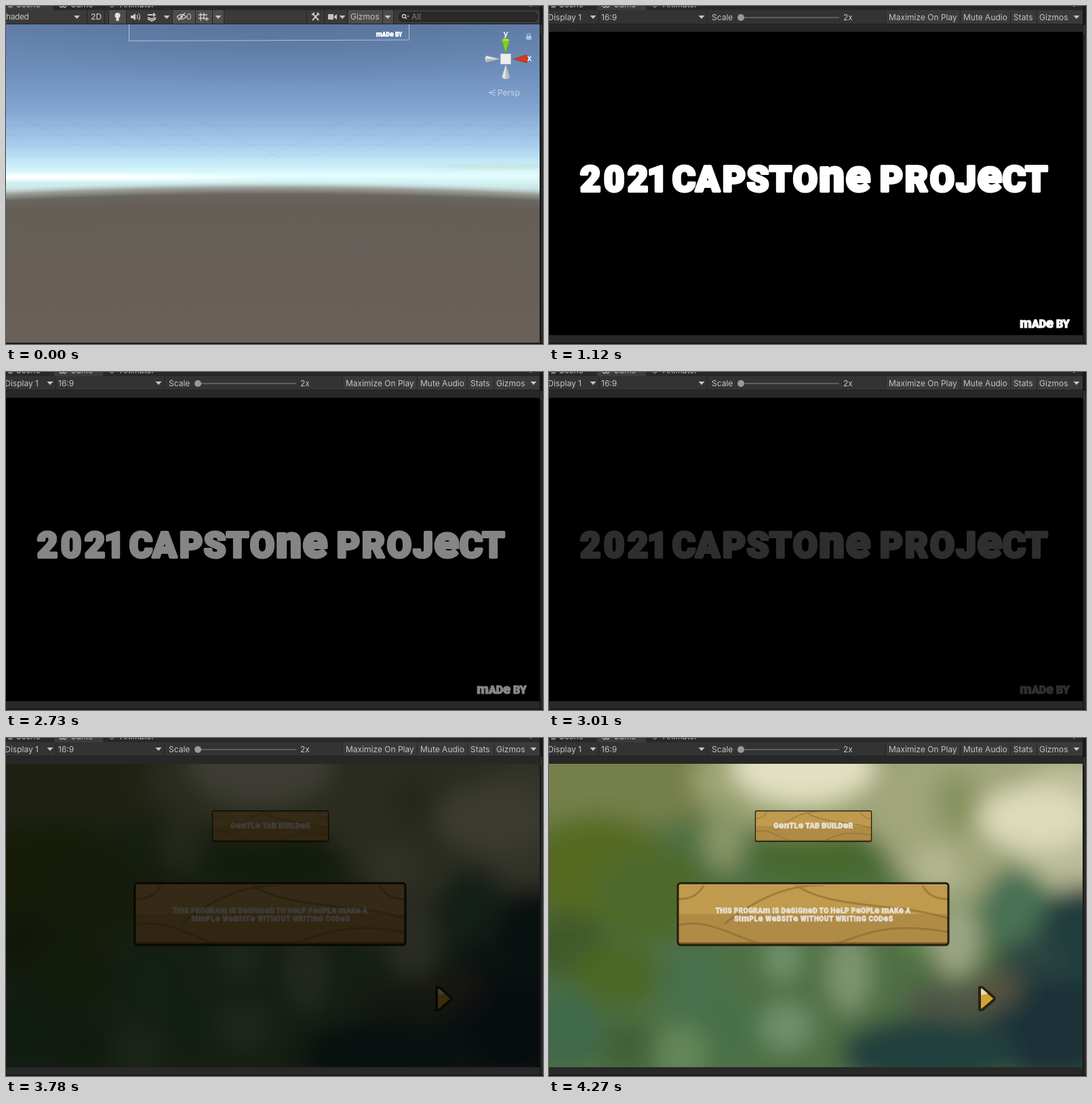
Recreate the animation shown at these times as an HTML page. Size 792 by 498 pixels, loop 4340 ms.

```html
<!DOCTYPE html>
<html lang="en">
<head>
<meta charset="utf-8">
<title>Intro fade</title>
<style>
html, body { margin: 0; width: 100%; height: 100%; overflow: hidden; background: #191919; }
svg { display: block; width: 100%; height: 100%; }
text { font-family: Inter, Roboto, sans-serif; font-size: 12px; fill: #c4c4c4; }
.fun { font-family: Roboto, "Open Sans", sans-serif; font-weight: 900; text-anchor: middle;
  fill: #fff; stroke: #fff; stroke-linejoin: round; }
.cream { fill: #e4ded0; stroke: #e4ded0; }
</style>
</head>
<body>
<svg viewBox="0 0 792 498" preserveAspectRatio="none">
  <defs>
    <linearGradient id="sky" gradientUnits="userSpaceOnUse" x1="0" y1="26" x2="0" y2="290">
      <stop offset="0" stop-color="#607ca5"/>
      <stop offset=".28" stop-color="#6f8fbc"/>
      <stop offset=".48" stop-color="#84a5d1"/>
      <stop offset=".66" stop-color="#a5c9ec"/>
      <stop offset=".78" stop-color="#c6ebf9"/>
      <stop offset=".85" stop-color="#e2feff"/>
      <stop offset=".89" stop-color="#d2f0f1"/>
      <stop offset="1" stop-color="#b5c6c6"/>
    </linearGradient>
    <radialGradient id="ground" gradientUnits="userSpaceOnUse" cx="393" cy="8000" r="7742">
      <stop offset=".968" stop-color="#6a605a"/>
      <stop offset=".9955" stop-color="#655e57"/>
      <stop offset=".9975" stop-color="#69655f"/>
      <stop offset=".9988" stop-color="#96958f" stop-opacity=".85"/>
      <stop offset="1" stop-color="#c9dcdc" stop-opacity="0"/>
    </radialGradient>
    <radialGradient id="dusk">
      <stop offset="0" stop-color="#4d6990" stop-opacity=".45"/>
      <stop offset="1" stop-color="#4d6990" stop-opacity="0"/>
    </radialGradient>
    <filter id="soft" filterUnits="userSpaceOnUse" x="-80" y="-60" width="970" height="660">
      <feGaussianBlur stdDeviation="17"/>
    </filter>
    <filter id="glow" filterUnits="userSpaceOnUse" x="-300" y="220" width="1300" height="60">
      <feGaussianBlur stdDeviation="30 2"/>
    </filter>
    <clipPath id="view"><rect y="38" width="787" height="447"/></clipPath>
    <clipPath id="sceneView"><rect y="27" width="787" height="469"/></clipPath>
    <clipPath id="board"><rect width="400" height="92" rx="4"/></clipPath>
  </defs>
  <rect width="792" height="498" fill="#191919"/>
  <g id="scene"></g>
  <g id="game"></g>
  <path d="M789.5 28V41" stroke="#333" stroke-width="3"/>
  <path d="M790.5 41V496" stroke="#2a2a2a" stroke-width="3"/>
</svg>
<script>
const $ = id => document.getElementById(id);
const rect = (x, y, w, h, fill, more = '') =>
  `<rect x="${x}" y="${y}" width="${w}" height="${h}" fill="${fill}" ${more}/>`;
const path = (d, stroke, width = 1, fill = 'none', more = '') =>
  `<path d="${d}" stroke="${stroke}" stroke-width="${width}" fill="${fill}" ${more}/>`;
const oval = (x, y, rx, ry, fill, more = '') =>
  `<ellipse cx="${x}" cy="${y}" rx="${rx}" ry="${ry}" fill="${fill}" ${more}/>`;
const label = (x, y, s, more = '') => `<text x="${x}" y="${y}" ${more}>${s}</text>`;
const drop = x => path(`M${x - 4.5} 14h9l-4.5 5z`, 'none', 0, '#c4c4c4');
const rules = xs => xs.map(x => rect(x, 6, 1, 20, '#242424')).join('');

// Unicase lettering: small n, e and m grow towards capital height.
function fun(x, y, size, edge, gap, s, tone = '') {
  const body = s.replace(/[nem]+/g, m => `<tspan style="font-size:${size * 1.28}px">${m}</tspan>`);
  const style = `font-size:${size}px;stroke-width:${edge}px;letter-spacing:${gap}px`;
  return label(x, y, body, `class="fun ${tone}" style="${style}"`);
}

function tabs(x, w) {
  return rect(0, 0, 787, 6, '#282828') + rect(x, 0, w, 6, '#3c3c3c') +
    label(15, 2, 'Scene') + label(95, 2, 'Game') + label(168, 2, 'Animator') +
    path('M3 1h7M5 0v3M8 0v3M153 0l3 2 3-2', '#aaa') +
    path('M79 0q3 4 5 0q3 4 5 0', '#bbb', 1.4) + rect(773, 0, 2, 1, '#aaa') +
    rect(0, 6, 787, 20, '#3a3a3a') + rect(0, 26, 787, 1, '#222');
}

function sceneBar() {
  const lit = [[152, 25], [246, 33], [279, 42], [505, 66]];
  return tabs(0, 69) + lit.map(([x, w]) => rect(x, 6, w, 20, '#4d4d4d')).join('') +
    rules([119, 145, 151, 177, 245, 279, 304, 321, 443, 469, 503, 555, 571]) +
    label(33.5, 20, 'Shaded', 'text-anchor="end" letter-spacing="-.4"') + drop(104.5) +
    label(125, 20, '2D', 'font-weight="500"') +
    oval(164.5, 14, 4, 4, '#e0e0e0') + rect(162.5, 17, 4, 5, '#e0e0e0') +
    path('M184 14h3l4-3v10l-4-3h-3z', 'none', 0, '#ccc') +
    path('M193 13q2 3 0 6M195.500 11q4 5 0 10', '#ccc', 1.2) +
    path('M209 13h6M209 17l6 2l6-2M209 19l6 3l6-3', '#ccc', 1.8) +
    path('M218 10v6M215 13h6', '#ddd', 1.5) + drop(237) +
    path('M252 16q7-7 14 0q-7 7-14 0M254 21L264 10', '#ccc', 1.3) +
    oval(259, 16, 2, 2, '#ccc') + label(266, 20, '0') +
    path('M284 13h13M284 18h9M287 10v12M292 10v10M296 16v6M293 19h6', '#ccc', 1.4) + drop(313) +
    path('M452 11l9 10M461 11l-9 10', '#c8c8c8', 2) +
    path('M451 13l4-3M459 10l3 3', '#c8c8c8', 2) +
    rect(475, 12, 8, 8, '#c4c4c4') + path('M484 15l4-3v8l-4-3z', 'none', 0, '#c4c4c4') + drop(496) +
    label(508, 20, 'Gizmos') + drop(563) +
    rect(579.5, 9.5, 204, 13, '#2a2a2a', 'rx="5" stroke="#202020"') +
    oval(587, 15, 2.5, 2.5, 'none', 'stroke="#ccc" stroke-width="1.3"') +
    path('M589 17l2 2M592 15h2', '#ccc', 1.3) + label(598, 20, 'All', 'style="fill:#808080"');
}

function axes() {
  return path('M731 50q6-4 12 0l-6 21z', '#4f7d1c', .5, '#79d01f') +
    path('M731 50q6-4 12 0q-6 3-12 0', 'none', 0, '#9be84a') +
    path('M768 72q3 6 0 12l-20-6z', '#8b2715', .5, '#d23a1d') +
    path('M708 73q-3 5 0 10l20-5z', '#8292a3', .5, '#e0e5e8') +
    path('M708 78l20 0l-20 5z', 'none', 0, '#aeb8c0') +
    path('M731 105q6 6 12 0l-6-19z', '#8292a3', .5, '#dfe2e3') +
    path('M737 86l6 19q-3 3-6 3z', 'none', 0, '#b9bec2') +
    rect(729.5, 70.5, 15, 15, '#eeeeee', 'stroke="#c9cdd1" stroke-width=".7"') +
    label(737, 45, 'y', 'text-anchor="middle" font-weight="600" style="fill:#fff"') +
    label(772, 81, 'x', 'text-anchor="middle" font-weight="600" style="fill:#fff"') +
    rect(767, 44, 8, 5.5, '#a9c4e2', 'rx="1"') + path('M769 44v-1.500a2 2 0 0 1 4 0v1.500', '#a9c4e2', 1.2) +
    path('M722 123l-10 4.500l10 4.500M712 127.500h10', '#bfd2e8') +
    label(725, 132, 'Persp', 'style="fill:#c6d7ea"');
}

function sky() {
  let lines = '';
  for (let i = 0; i < 6; i++) {
    const x = i * 75, y = 140 + i * 5;
    lines += `M${x - 160} ${y - 30}L${x + 30} ${y + 60}M${946 - x} ${y - 30}L${756 - x} ${y + 60}`;
  }
  for (let i = 0; i < 5; i++) lines += `M0 ${160 + i * 15}H787`;
  return '<g clip-path="url(#sceneView)">' + rect(0, 26, 787, 470, 'url(#sky)') +
    oval(410, 27, 430, 95, 'url(#dusk)') +
    path(lines, '#5c7596', 1, 'none', 'opacity=".1"') +
    oval(90, 252, 260, 4, '#fff', 'filter="url(#glow)"') +
    oval(730, 236, 110, 4, '#c6d9ce', 'filter="url(#glow)" opacity=".5"') +
    rect(0, 240, 787, 256, 'url(#ground)') +
    path('M181.500 27V51.500L594.500 50V27', '#a9c3e0') +
    fun(565, 45, 8.2, .6, .1, 'mADe BY') + axes() + '</g>';
}

function gameBar() {
  return tabs(71, 72) + rect(0, 6, 496, 20, '#333') +
    rules([73, 233, 496, 606, 680, 719]) +
    label(48, 21, 'Display 1', 'text-anchor="end"') + drop(65) +
    label(77, 21, '16:9') + drop(225) + label(240, 21, 'Scale') +
    rect(283, 16, 145, 2, '#5e5e5e') + oval(283, 17, 5, 5, '#999') +
    label(434, 21, '2x') + label(501, 21, 'Maximize On Play') +
    label(611, 21, 'Mute Audio') + label(685, 21, 'Stats') + label(723, 21, 'Gizmos') + drop(778) +
    rect(0, 27, 787, 11, '#272727') + rect(0, 485, 787, 11, '#282828') + rect(0, 38, 787, 447, '#000');
}

// Soft woodland backdrop: x, y, rx, ry, colour.
const blobs = [
  [90, 60, 190, 75, '#747f49'], [375, 60, 165, 78, '#9ca472'], [650, 110, 185, 130, '#a0a57b'],
  [790, 130, 110, 100, '#babb97'], [375, 42, 105, 55, '#e2e0c2'], [258, 145, 30, 50, '#8a9668'],
  [600, 95, 32, 48, '#87935f'], [720, 118, 85, 48, '#dcdab9'], [70, 195, 115, 80, '#576a22'],
  [150, 230, 90, 70, '#4d6a2a'], [400, 178, 105, 40, '#46692d'], [550, 260, 40, 55, '#688a55'],
  [570, 195, 36, 38, '#b3b68f'], [600, 295, 36, 58, '#9ba582'], [690, 250, 52, 60, '#4a7153'],
  [790, 310, 75, 95, '#203c3e'], [710, 355, 55, 60, '#2b443f'], [745, 430, 110, 80, '#1b3338'],
  [560, 465, 130, 55, '#233f3d'], [600, 385, 80, 30, '#4f5844'], [660, 368, 38, 26, '#555341'],
  [25, 305, 65, 50, '#3f5a2a'], [100, 350, 65, 50, '#4b6827'], [25, 430, 55, 60, '#41694a'],
  [195, 465, 38, 42, '#63875a'], [215, 365, 50, 60, '#46704c'], [345, 325, 28, 34, '#70926a'],
  [350, 425, 40, 36, '#6d906a'], [442, 345, 32, 60, '#7d9470'], [275, 430, 36, 50, '#47704a'],
  [115, 455, 40, 40, '#3f6238']
];

const grain = 'M2 24Q30 24 40 2M398 24Q370 24 360 2M70 60C120 20 170 2 215 4' +
  'M175 4C230 40 320 28 398 52M2 62C50 50 90 85 130 90M230 90C270 80 300 55 398 72';

function board(x, y, w, h) {
  return `<g transform="translate(${x} ${y}) scale(${w / 400} ${h / 92})"><g clip-path="url(#board)">` +
    rect(0, 0, 400, 92, '#c09a4d') + rect(0, 46, 400, 46, '#b08b45') +
    path(grain, '#8b6a31', 3, 'none', 'opacity=".6"') +
    rect(0, 2, 400, 2, '#cda85d') + rect(0, 87, 400, 5, '#7c5c29') + '</g>' +
    rect(1, 1, 398, 90, 'none', 'rx="4" stroke="#221d10" stroke-width="3"') + '</g>';
}

function menu() {
  return '<g clip-path="url(#view)">' + rect(0, 38, 787, 447, '#4f7045') + '<g filter="url(#soft)">' +
    rect(-60, -40, 910, 620, '#4f7045') + blobs.map(b => oval(...b)).join('') + '</g>' +
    board(304, 107, 172, 46) + board(189, 213, 401, 93) +
    fun(390, 133, 10.5, .9, .4, 'GenTLe TAB BUILDeR', 'cream') +
    fun(389.5, 257.5, 10, .8, .4, 'THIS PROGRAm IS DeSIGneD TO HeLP PeOPLe mAKe A', 'cream') +
    fun(390.5, 269.5, 10, .8, .6, 'SImPLe WeBSITe WITHOUT WRITInG CODeS', 'cream') +
    path('M635 367.500L639 367.500L655.500 381.500Q658.500 384 655.500 386.500L639 400.500L635 400.500z',
      '#2a2115', 4, '#d0a52f', 'stroke-linejoin="round"') +
    path('M637 369.500L639 369.500L647 376.500L637 379z', 'none', 0, '#e6dcbd') + '</g>';
}

const centres = '61 96 131 160 178 199 234 273 308 341.5 378 417 456 480 505 542 580 615 650 686 719';

$('scene').innerHTML = sceneBar() + sky();
$('game').innerHTML = gameBar() +
  '<g id="title">' + fun(centres, 272.5, 52, 4, 0, '2021 CAPSTOne PROJeCT') +
  fun(731, 473.5, 16, 1.2, -.1, 'mADe BY') + '</g><g id="menu">' + menu() + '</g>';

const LOOP = 4340, TICK = 70;
const ticks = (t, from) => Math.floor((t - from) / TICK);

function titleLevel(t) {
  if (t < 490) return 0;
  if (t < 630) return .29;
  if (t < 2380) return Math.min(1, .38 + .0886 * ticks(t, 630));
  return t < 3150 ? Math.max(0, .95 - .0856 * ticks(t, 2380)) : 0;
}

const menuLevel = t => t < 3640 ? 0 : Math.min(1, .06 + .1044 * ticks(t, 3640));

function show(id, level) {
  $(id).style.opacity = level;
  $(id).style.display = level ? '' : 'none';
}

function draw() {
  const t = performance.now() % LOOP;
  show('scene', t < 210 ? 1 : 0);
  show('game', t < 210 ? 0 : 1);
  show('title', titleLevel(t));
  show('menu', menuLevel(t));
  requestAnimationFrame(draw);
}
draw();
</script>
</body>
</html>
```
